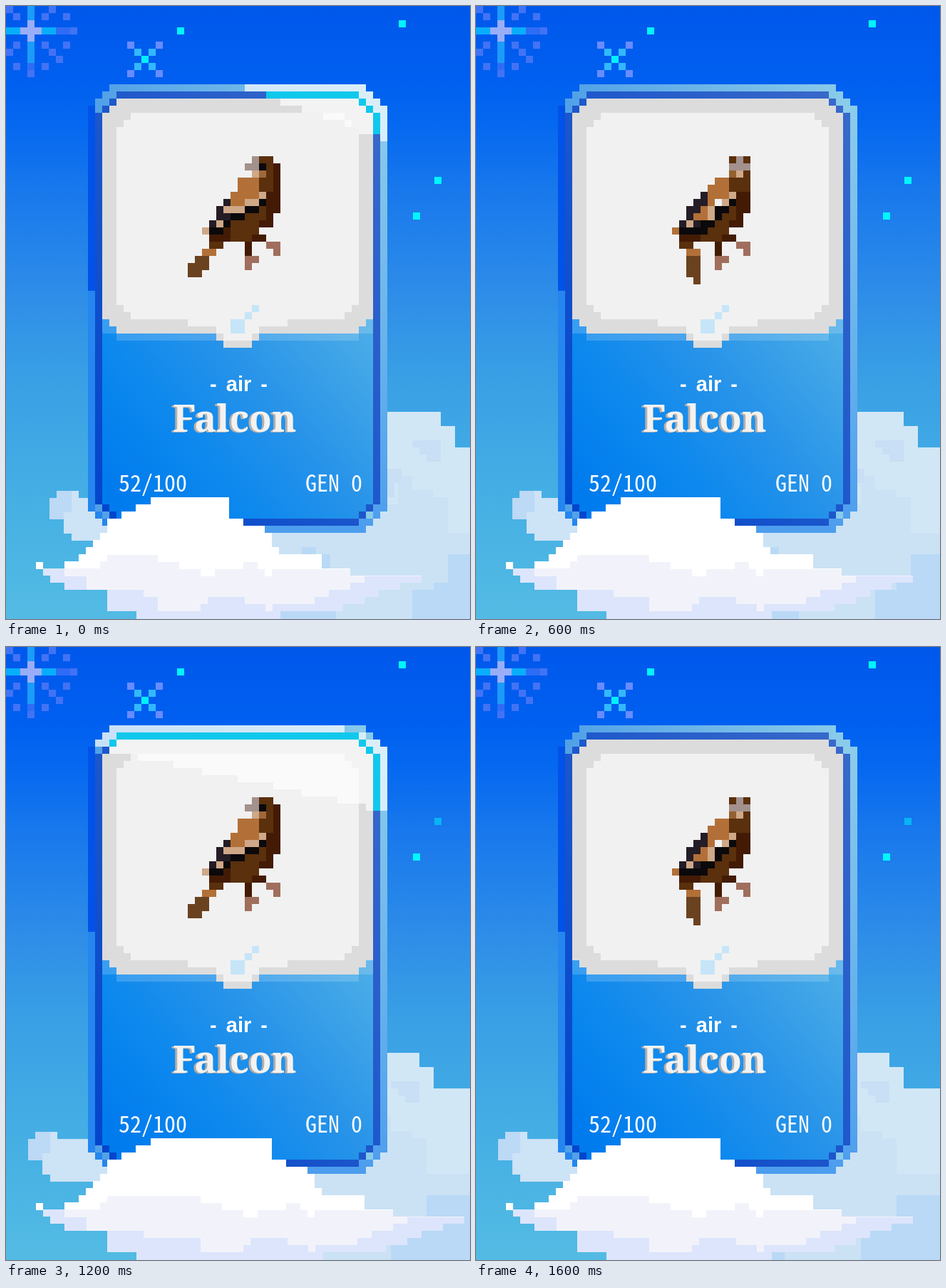
Write an HTML page that moves like this. It is 651 by 861 pixels and loops after 1.7 s.

```html
<!DOCTYPE html>
<html lang="en">
<head>
<meta charset="utf-8">
<title>Falcon card</title>
<style>
html, body { margin: 0; width: 100%; height: 100%; overflow: hidden; background: #2e8ce8; }
svg { display: block; width: 100vw; height: 100vh; }
path, rect { shape-rendering: crispEdges; }
.small { font: 500 32px "Noto Sans Mono CJK JP", "Noto Sans CJK JP", monospace; fill: #fff; }
.kind { font: bold 29px "Liberation Sans", sans-serif; fill: #fff; word-spacing: 5px; }
.name { font: bold 52px "Noto Serif", serif; }
</style>
</head>
<body>
<svg id="stage" viewBox="0 0 651 861" preserveAspectRatio="none">
  <defs>
    <linearGradient id="sky" x2="0" y2="1">
      <stop offset="0" stop-color="#0058eb"/>
      <stop offset=".12" stop-color="#005ff0"/>
      <stop offset=".2" stop-color="#0669f0"/>
      <stop offset=".3" stop-color="#1878ec"/>
      <stop offset=".47" stop-color="#2e8de8"/>
      <stop offset=".6" stop-color="#389fe5"/>
      <stop offset=".8" stop-color="#45afe4"/>
      <stop offset="1" stop-color="#53bbe3"/>
    </linearGradient>
    <linearGradient id="dusk" x2="0" y2="1">
      <stop offset="0" stop-color="#0040ea" stop-opacity=".3"/>
      <stop offset=".7" stop-color="#0040ea" stop-opacity="0"/>
    </linearGradient>
    <linearGradient id="rimTop">
      <stop offset="0" stop-color="#4f9fe8"/>
      <stop offset="1" stop-color="#8ccdea"/>
    </linearGradient>
    <linearGradient id="rimRight" x2="0" y2="1">
      <stop offset="0" stop-color="#8ccdea"/>
      <stop offset="1" stop-color="#4c9dee"/>
    </linearGradient>
    <linearGradient id="line" x1="0" y1="1" x2="1" y2="0">
      <stop offset="0" stop-color="#0044cc"/>
      <stop offset="1" stop-color="#3a6aca"/>
    </linearGradient>
    <linearGradient id="panel" gradientUnits="userSpaceOnUse" x1="180" y1="720" x2="500" y2="450">
      <stop offset="0" stop-color="#007bee"/>
      <stop offset=".3" stop-color="#0c88ee"/>
      <stop offset=".6" stop-color="#2793e9"/>
      <stop offset="1" stop-color="#4aace7"/>
    </linearGradient>
    <linearGradient id="cyan" gradientUnits="userSpaceOnUse" x1="0" y1="120" x2="0" y2="320">
      <stop offset=".6" stop-color="#10c8ec"/>
      <stop offset="1" stop-color="#10c8ec" stop-opacity="0"/>
    </linearGradient>
    <clipPath id="bandClip"><path id="band"/></clipPath>
    <clipPath id="nearClip"><path id="nearEdge"/></clipPath>
  </defs>
</svg>
<script>
const NS = 'http://www.w3.org/2000/svg';
const stage = document.getElementById('stage');
const band = document.getElementById('band');
const nearEdge = document.getElementById('nearEdge');

function add(parent, tag, attrs, text) {
  const el = document.createElementNS(NS, tag);
  for (const key in attrs) el.setAttribute(key, attrs[key]);
  if (text) el.textContent = text;
  return parent.appendChild(el);
}
const group = (parent = stage, attrs = {}) => add(parent, 'g', attrs);
const show = (el, on) => el.setAttribute('visibility', on ? 'visible' : 'hidden');

// Right-angled outline: start corner, then across and down to each next one
function outline(pts) {
  let d = `M${pts[0]} ${pts[1]}`;
  for (let i = 2; i < pts.length; i += 2) d += `H${pts[i]}V${pts[i + 1]}`;
  return d + `H${pts[0]}z`;
}
const fill = (parent, color, ...shapes) =>
  add(parent, 'path', { fill: color, d: shapes.map(outline).join('') });
const cell = (x, y) => [x * 10, y * 10, x * 10 + 10, y * 10 + 10];

// Box whose corners are cut by n steps of 10
function stepped(x0, y0, x1, y1, n) {
  const c = n * 10, run = (a, b) => (a + b).repeat(n);
  return `M${x0 + c} ${y0}H${x1 - c}` + run('v10', 'h10') + `V${y1 - c}` + run('h-10', 'v10') +
    `H${x0 + c}` + run('v-10', 'h-10') + `V${y0 + c}` + run('h10', 'v-10') + 'z';
}

// Sky and stars
const all = { width: 651, height: 861 };
add(stage, 'rect', { ...all, fill: 'url(#sky)' });
const dusk = add(stage, 'rect', { ...all, fill: 'url(#dusk)' });

const signs = [-1, 1];
const corners = (x, y, r) => signs.flatMap(a => signs.map(b => cell(x + a * r, y + b * r)));
fill(stage, '#4273f5', ...corners(3, 3, 2), ...corners(3, 3, 3), cell(7, 7), cell(9, 3), cell(3, 9),
  ...signs.flatMap(s => [cell(8, 3 + 2 * s), cell(3 + 2 * s, 8)]));
fill(stage, '#2f6cf5', [70, 30, 90, 40], cell(3, 8));
fill(stage, '#08aefc', [0, 30, 70, 40]);
fill(stage, '#1b9cfa', [30, 0, 40, 80]);
fill(stage, '#99aef8', [30, 20, 40, 50], [20, 30, 50, 40]);

const cross = group();
fill(cross, '#688cff', ...corners(19, 7, 2));
fill(cross, '#32b8ff', ...corners(19, 7, 1));
fill(cross, '#00f0ff', cell(19, 7));

fill(stage, '#00f6ff', cell(24, 3), cell(55.1, 2), cell(57.1, 29));
const blinker = fill(stage, '#00f6ff', cell(60.1, 24));
const lowStar = fill(stage, '#00f6ff', cell(2, 43));

// Far clouds
const far = group();
fill(far, '#d2e7f6', [500, 570, 610, 590, 630, 620, 700, 861, 360, 730]);
fill(far, '#cbe2f5', [500, 700, 550, 660, 570, 680, 600, 690, 620, 740, 700, 861, 360, 730]);
fill(far, '#c8dff5', [570, 610, 610, 640, 590, 630, 580, 620], [535, 650, 555, 670, 545, 690]);
fill(far, '#b9d9f6', [415, 760, 435, 770, 455, 790], [620, 770, 700, 861, 570, 820, 600, 810]);
fill(far, '#b9d9f6', [400, 841, 453, 850, 463, 861, 380, 850]);
fill(far, '#cde3f6', [71, 681, 102, 691, 240, 751, 92, 741, 81, 721, 61, 691]);
fill(far, '#bcd9f6', [71, 681, 92, 711, 81, 721, 61, 691]);

// Card
const card = group();
const rim = stepped(115, 110, 535, 740, 3);
const line = stepped(125, 120, 525, 730, 3);
const inner = stepped(135, 130, 515, 720, 2);
add(card, 'path', { fill: 'url(#rimTop)', d: rim });
fill(card, 'url(#rimRight)', [515, 140, 535, 710, 525, 720, 515, 730, 505, 740, 145, 720]);
fill(card, '#0052e8', [115, 140, 125, 400]);
fill(card, '#2486ee', [115, 400, 125, 710], [125, 710, 135, 720], [135, 720, 145, 730]);
add(card, 'path', { fill: 'url(#line)', d: line });
add(card, 'path', { fill: 'url(#panel)', d: inner });
const strip = fill(card, '#fff', [135, 440, 515, 460, 495, 470, 155, 460]);
strip.setAttribute('opacity', .17);
add(card, 'path', { fill: '#dcdcdc', d: stepped(135, 130, 515, 460, 2) });
fill(card, '#dcdcdc', [295, 450, 355, 470, 345, 480, 305, 470]);
add(card, 'path', { fill: '#f1f1f1', d: stepped(155, 150, 495, 440, 2) });
fill(card, '#f1f1f1', [255, 430, 395, 450, 355, 460, 345, 470, 305, 460, 295, 450]);
fill(card, '#c6e5f8', [315, 440, 335, 460], [335, 430, 345, 440], [345, 420, 355, 430]);

// Light sweep
const shine = group(stage, { 'clip-path': 'url(#bandClip)' });
add(shine, 'path', { fill: '#fff', d: rim, opacity: .68 });
add(shine, 'path', { fill: 'url(#cyan)', d: line + inner, 'fill-rule': 'evenodd' });

// Bird, one unit per block
const bird = group(stage, { transform: 'translate(254.8 210.8) scale(10.02)' });
const brown = '#5a300d', dark = '#431b05', orange = '#b27038', tan = '#cfa887';
const black = '#0b090b', ink = '#241c26', grey = '#a3918d', tail = '#6b4220', pink = '#a06e5c';
const dot = (x, y) => [x, y, x + 1, y + 1];

fill(bird, dark, [10, 3, 13, 8, 12, 10, 10, 11, 11, 12, 9, 14, 8, 12, 3, 11, 5, 10, 6, 7]);
fill(bird, brown, [10, 3, 12, 5], [10, 7, 11, 9, 10, 11, 9, 12, 6, 9, 8, 8], [3, 12, 5, 13]);
fill(bird, pink, [11, 12, 13, 14, 12, 13], [8, 14, 10, 15, 9, 16]);

const wing = group(bird);
fill(wing, orange, [7, 3, 10, 6, 8, 7, 6, 5], [2, 13, 4, 14]);
fill(wing, tan, [8, 6, 10, 7, 8, 8, 5, 7], dot(10, 5), dot(4, 9), dot(2, 10));
fill(wing, black, [10, 6, 11, 7, 10, 8, 8, 7], [6, 8, 8, 9, 6, 10, 5, 9], [3, 10, 5, 11]);
fill(wing, ink, [5, 6, 6, 7, 5, 8, 6, 9, 4, 10, 3, 9, 4, 7]);

const side = group(bird);
fill(side, dark, [12, 1, 13, 3]);
fill(side, brown, [10, 0, 12, 3]);
fill(side, grey, [9, 0, 10, 2, 8, 1]);
fill(side, black, dot(10, 1));
fill(side, tan, dot(9, 2));
fill(side, '#a0683a', dot(10, 2));
fill(side, tail, [1, 14, 3, 16, 2, 17, 0, 15]);

const turn = group(bird);
fill(turn, dark, [12, 1, 13, 3]);
fill(turn, brown, [9, 0, 12, 3]);
fill(turn, grey, [10, 0, 11, 2, 9, 1]);
fill(turn, black, dot(11, 1));
fill(turn, '#a0683a', dot(9, 2));
fill(turn, tan, dot(10, 2));
fill(turn, tail, [2, 14, 4, 16, 3, 17, 2, 18, 1, 16]);

const front = group(bird);
fill(front, brown, [10, 0, 13, 5]);
fill(front, grey, [11, 0, 12, 1, 13, 2, 10, 1]);
fill(front, '#946030', dot(10, 2));
fill(front, orange, [8, 3, 10, 6, 8, 7, 7, 4], [6, 7, 7, 9, 5, 8], dot(2, 10), [4, 13, 6, 14]);
fill(front, tan, dot(11, 2), dot(10, 5), dot(9, 6), [7, 7, 8, 9], dot(4, 9));
fill(front, black, [10, 6, 11, 7, 10, 8, 9, 9, 8, 10, 7, 11, 3, 10, 6, 9, 8, 7]);
fill(front, ink, [6, 5, 7, 7, 6, 8, 5, 9, 4, 10, 3, 9, 4, 7, 5, 6], dot(5, 9));
fill(front, tail, [4, 14, 6, 18, 5, 17]);

// Labels
const label = (cls, x, y, text, attrs = {}) => add(stage, 'text', { class: cls, x, y, ...attrs }, text);
label('kind', 326.5, 541, '- air -', { 'text-anchor': 'middle' });
label('name', 231, 599, 'Falcon', { fill: '#b4b0ae' });
label('name', 234, 598, 'Falcon', { fill: '#f3f2f0' });
label('small', 158, 682, '52/100');
label('small', 420, 682, 'GEN 0');

// Near cloud: everything right of x = 210 slides, the rest stays
const puff = fill(stage, '#fff', [115, 690, 150, 700, 170, 710, 183, 700, 210, 750, 120, 740, 140, 730, 125, 705]);
const near = group(stage, { 'clip-path': 'url(#nearClip)' });
const crest = [203, 690, 313, 720, 333, 730, 363, 740, 373, 760, 383, 770, 443, 790, 483, 800, 583, 810];
const base = [553, 820, 523, 830, 503, 840, 473, 850, 385, 861, 183, 850, 142, 820, 82, 810, 62, 800, 52, 790];
const slope = [82, 780, 102, 770, 112, 760, 122, 750, 132, 740, 142, 720, 162, 710, 182, 700];
const edge = [...crest, ...base, ...slope];
const shade = [82, 790, 132, 780, 142, 771, 213, 781, 243, 791, 273, 801, 293, 791, 333, 781,
  353, 791, 363, 801, 373, 791, 700, 861];
const under = [142, 820, 193, 830, 213, 850, 273, 840, 283, 830, 335, 840, 364, 850, 374, 840,
  433, 830, 453, 820, 483, 810, 503, 801, 700, 861];
add(near, 'rect', { ...all, fill: '#fff' });
const layers = [
  [nearEdge, edge],
  [fill(near, '#f2f3fa', shade), shade],
  [fill(near, '#dde5fc', under), under]
];
fill(near, '#dde5fc', [52, 790, 82, 801, 113, 820, 52, 811]);
fill(stage, '#fff', [42, 781, 52, 791]);

const slide = (pts, dx) => pts.map((v, i) => i % 2 === 0 && v > 210 ? v + dx : v);

// Slanted band of light in steps of 10
function sweep(c, low) {
  const snap = (mid, tilt, x) => Math.round((mid + tilt * (x - 325)) / 10) * 10;
  let top = '', bottom = '';
  for (let x = 115; x < 535; x += 10) {
    top += `${x ? 'L' : ''}${x} ${snap(c - 120, .34, x + 5)}H${x + 10}`;
    bottom = `L${x + 10} ${snap(c, low, x + 5)}H${x}` + bottom;
  }
  return 'M' + top.slice(1) + bottom + 'z';
}

const LOOP = 1700, STEP = 100;

function draw(time) {
  const k = Math.floor((time % LOOP) / STEP), t = k * STEP;

  show(dusk, k === 10);
  show(lowStar, k === 9 || k === 10);
  blinker.setAttribute('fill', k && k % 4 === 0 ? '#08b4f6' : '#00f6ff');
  cross.setAttribute('opacity', k === 3 ? .35 : k === 2 || k === 4 ? .7 : 1);

  const drift = -10 * Math.min(3, Math.floor((t + 50) / 340));
  far.setAttribute('transform', `translate(${drift} 0)`);

  band.setAttribute('d', k < 8 ? sweep(112 + 2.8 * t, .36) : sweep(185 + 2.8 * (t - 1200), .22));

  const facing = (k >= 4 && k <= 7) || k === 16;
  const turning = k === 3 || k === 8 || k === 15;
  show(front, facing);
  show(turn, turning);
  show(side, !facing && !turning);
  show(wing, !facing);

  const dx = k < 5 ? 0 : k < 11 || k === 16 ? 30 : 60;
  for (const [el, pts] of layers) el.setAttribute('d', outline(slide(pts, dx)));
  show(puff, k === 3);
}

const start = performance.now();
function tick() {
  draw(performance.now() - start);
  requestAnimationFrame(tick);
}
tick();
</script>
</body>
</html>
```
